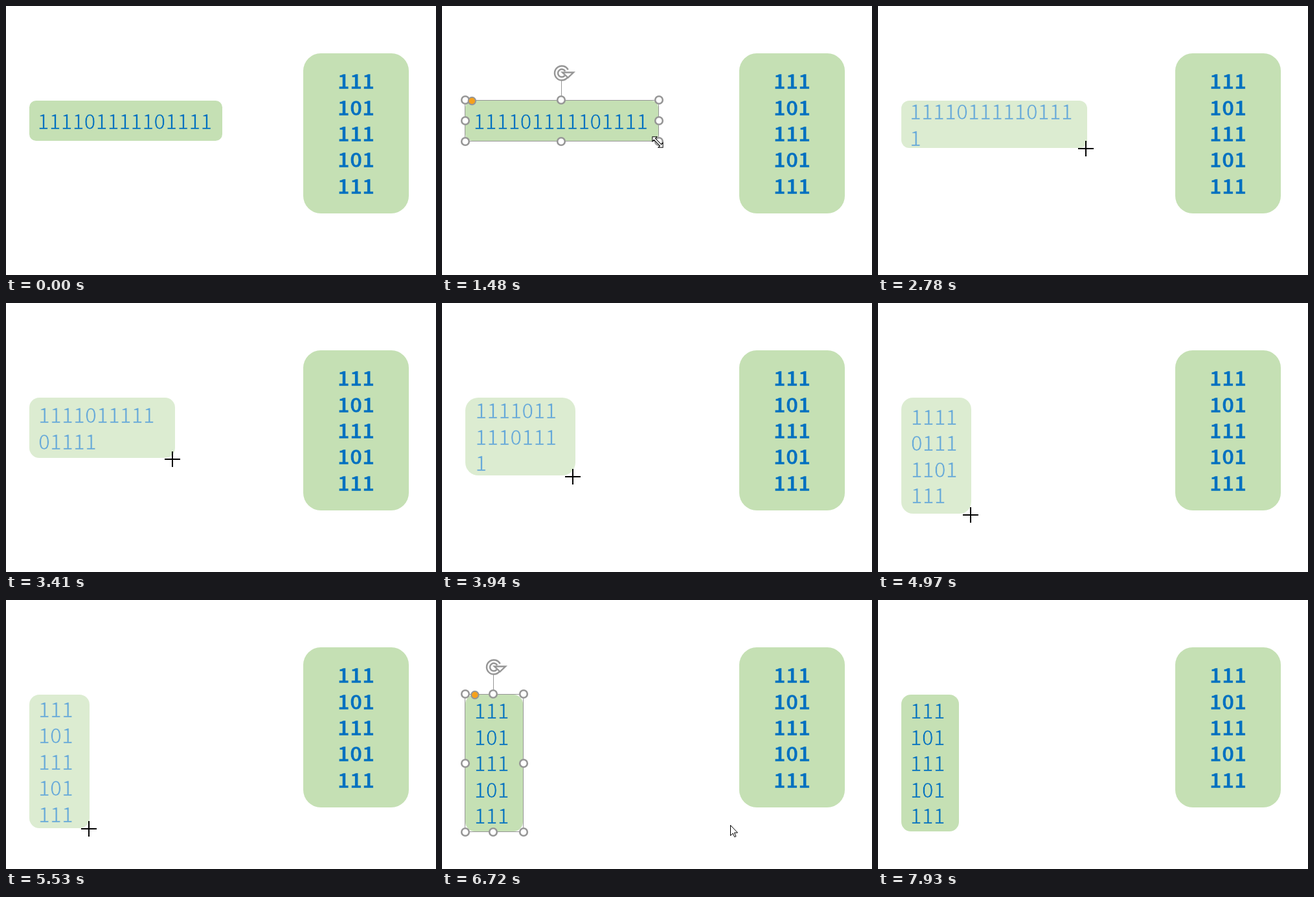
An HTML page for the animation above (8700 ms loop, 664 by 415 pixels).

```html
<!DOCTYPE html>
<html lang="en">
<head>
<meta charset="utf-8">
<title>Reflowing digits</title>
<style>
  html, body { margin: 0; width: 100%; height: 100%; overflow: hidden; background: #fff; }
  svg { display: block; width: 664px; height: 415px; }
  /* the outline in the box colour thins the strokes */
  text {
    font: 300 32.4px "Noto Sans CJK SC", "Noto Sans CJK JP", "Noto Sans CJK", "Noto Sans", sans-serif;
    fill: #0070c0; stroke: #c5e0b4; stroke-width: .7px;
  }
  .bold { font-weight: 700; text-anchor: middle; stroke-width: .3px; }
  .shape { fill: #c5e0b4; }
  .frame { fill: none; stroke: #969696; }
  .handle { fill: #fff; stroke: #969696; stroke-width: 2.6; }
  .adjust { fill: #f5a11c; stroke-width: 2; }
  .pointer { fill: #fff; stroke: #000; }
</style>
</head>
<body>
<svg viewBox="0 0 664 415">
  <rect class="shape" x="459" y="73" width="163" height="247" rx="27"/>
  <g id="target"></g>
  <g id="left"></g>
  <g id="selection"></g>
  <g id="cursor"></g>
</svg>
<script>
const LOOP = 8700, DIGITS = '111101111101111';
const X = 36, Y = 146, ADVANCE = 17.95, LEADING = 40.5, MARGIN = 9.5;
const ENTER = 60, SELECT = 940, HANDLE = 1180, PRESS = 2080, DRAG = 2280,
  RELEASE = 6260, DESELECT = 7300, EXIT = 7930;
const LAG = 40;  // the box trails the cursor while it is dragged

// Cursor stops: arrival time, x, y and, where it rests, departure time
const stops = [
  [ENTER, 587, 0], [590, 363, 196, 750], [SELECT, 322, 188], [1220, 333, 210, 1480],
  [1570, 324, 199], [1750, 336, 212, DRAG], [2780, 321, 220], [3410, 257, 241],
  [4390, 167, 293], [5530, 128, 353], [5760, 125, 357, RELEASE],
  [6420, 445, 347, 6720], [7090, 381, 342, DESELECT], [EXIT, 449, -22]
];
const keys = stops.flatMap(([t, x, y, leave]) => leave ? [[t, x, y], [leave, x, y]] : [[t, x, y]]);

const $ = id => document.getElementById(id);

// Monotone cubic interpolation of one column of the keys
function sample(t, col) {
  const last = keys.length - 1;
  if (t <= keys[0][0]) return keys[0][col];
  if (t >= keys[last][0]) return keys[last][col];
  const i = keys.findIndex(k => k[0] > t) - 1;
  const rate = j => (keys[j + 1][col] - keys[j][col]) / (keys[j + 1][0] - keys[j][0]);
  const slope = j => {
    if (j === 0 || j === last) return 0;
    const a = rate(j - 1), b = rate(j);
    return a * b > 0 ? 2 * a * b / (a + b) : 0;
  };
  const span = keys[i + 1][0] - keys[i][0], u = (t - keys[i][0]) / span, v = 1 - u;
  return keys[i][col] * v * v * (1 + 2 * u) + keys[i + 1][col] * u * u * (3 - 2 * u)
    + span * u * v * (slope(i) * v - slope(i + 1) * u);
}

const cursorPos = t => [1, 2].map(col => Math.round(sample(t, col)));

// Right and bottom edge of the box
const boxCorner = t => t < DRAG ? [334, 208] : cursorPos(Math.min(t, RELEASE) - LAG);

function drawBox(w, h) {
  const r = Math.min(w, h) / 6, pad = MARGIN + r * 0.293;
  const perLine = Math.max(1, Math.floor((w - 2 * pad) / ADVANCE));
  const lines = DIGITS.match(new RegExp(`.{1,${perLine}}`, 'g'));
  const first = Y + h / 2 + 12.75 - (lines.length - 1) * LEADING / 2;
  return `<rect class="shape" x="${X}" y="${Y}" width="${w}" height="${h}" rx="${r}"/>` +
    lines.map((s, i) => `<text x="${X + pad}" y="${first + i * LEADING}">${s}</text>`).join('');
}

function drawSelection(w, h) {
  const l = X, r = X + w + 1, top = Y - 1, b = Y + h + 1;
  const cx = Math.floor(X + w / 2) - 1, cy = Math.round((top + b) / 2);
  const arc = 'M7.5 -4A8.5 8.5 0 1 0 6.5 5.5';
  let handles = '';
  for (const x of [l, cx, r])
    for (const y of [top, cy, b])
      if (x !== cx || y !== cy) handles += `<circle class="handle" cx="${x}" cy="${y}" r="5.8"/>`;
  return `<path class="frame" d="M${l - .5} ${top + .5}H${r - .5}V${b - .5}H${l - .5}ZM${cx + .5} ${top}V114"/>` +
    handles +
    `<circle class="handle adjust" cx="${l + Math.min(w, h) / 6}" cy="146.5" r="5.7"/>` +
    `<g transform="translate(${cx + 1} 103.5)" fill="none" stroke="#969696">
      <path d="${arc}" stroke-width="7.5"/>
      <path d="M1 -1H18L9.5 7Z" fill="#fff" stroke-width="2.4"/>
      <path d="${arc}" stroke="#fff" stroke-width="2.6"/></g>`;
}

const cursors = {
  arrow: '<path class="pointer" d="M.5 .5V16.5L4.2 13 6.8 18.6 9 17.6 6.5 12H11.5Z"/>',
  resize: '<path class="pointer" transform="rotate(45)" d="M-11.5 0L-6.5 -5V-1.5H6.5V-5L11.5 0 6.5 5V1.5H-6.5V5Z"/>',
  cross: '<path d="M-12 0H12M0 -12V12" stroke="#000" stroke-width="2"/>'
};

function cursorAt(t) {
  if (t < ENTER || t >= EXIT) return '';
  if (t < HANDLE || t >= RELEASE) return cursors.arrow;
  return t < PRESS ? cursors.resize : cursors.cross;
}

function render(t) {
  const [right, bottom] = boxCorner(t), w = right - X, h = bottom - Y;
  const dragging = t >= DRAG && t < RELEASE;
  const selected = t >= SELECT && t < DESELECT && !dragging;
  $('left').innerHTML = drawBox(w, h);
  $('left').setAttribute('opacity', dragging ? 0.6 : 1);
  $('selection').innerHTML = selected ? drawSelection(w, h) : '';
  $('cursor').innerHTML = cursorAt(t);
  $('cursor').setAttribute('transform', `translate(${cursorPos(t)})`);
}

$('target').innerHTML = ['111', '101', '111', '101', '111']
  .map((s, i) => `<text class="bold" x="540.5" y="${128.2 + i * 40.4}">${s}</text>`).join('');

const start = performance.now();
function tick() {
  render((performance.now() - start) % LOOP);
  requestAnimationFrame(tick);
}
tick();
</script>
</body>
</html>
```
